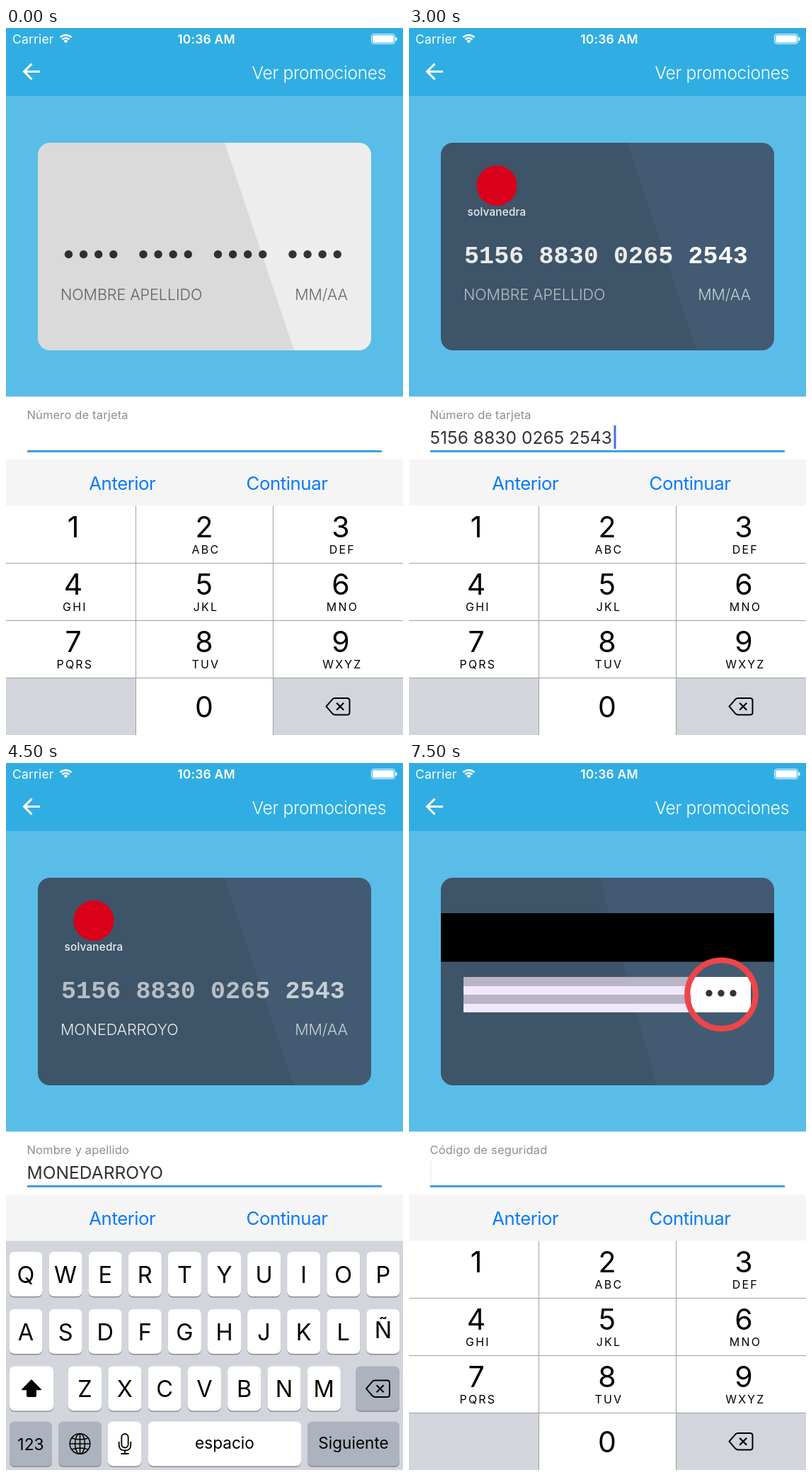
These frames come from a looping animation (561x998 px, 8 s). An HTML page with a canvas:

```html
<!DOCTYPE html>
<html lang="es">
<head>
<meta charset="utf-8">
<title>Formulario de tarjeta</title>
<style>
  html, body { margin: 0; width: 100%; height: 100%; overflow: hidden; background: #fff; }
  canvas { display: block; width: 561px; height: 998px; }
</style>
</head>
<body>
<canvas id="stage" width="561" height="998"></canvas>
<script>
const ctx = document.getElementById('stage').getContext('2d');
const SANS = 'Inter, Roboto, sans-serif';
const MONO = '"Liberation Mono", monospace';
const LOOP = 8000, STEP = 1500;
const CARD = { x: 45, y: 162, w: 471, h: 293, r: 17 };
const HOLDER = 'MONEDARROYO', NUMBER = '5156 8830 0265 2543';

const steps = [
  { label: 'Número de tarjeta', value: '', digits: '', focus: 'number', plain: true },
  { label: 'Número de tarjeta', value: '5156 88', digits: '5156 88', focus: 'number' },
  { label: 'Número de tarjeta', value: NUMBER, digits: NUMBER, focus: 'number', caret: 291 },
  { label: 'Nombre y apellido', value: HOLDER, digits: NUMBER, name: HOLDER, focus: 'name', letters: true },
  { label: 'Fecha de expiración', value: '12/31', digits: NUMBER, name: HOLDER, date: '12/31', focus: 'date', caret: 90.7 },
  { label: 'Código de seguridad', value: '', back: true, caret: 31, caretAlpha: 0.06 }
];

function text(str, x, y, size, color, { align = 'left', weight = 400, gap = 0, font = SANS } = {}) {
  ctx.font = `${weight} ${size}px ${font}`;
  ctx.letterSpacing = gap + 'px';
  ctx.textAlign = align;
  ctx.fillStyle = color;
  ctx.fillText(str, x, y);
}

function rect(x, y, w, h, color) {
  ctx.fillStyle = color;
  ctx.fillRect(x, y, w, h);
}

function round(x, y, w, h, r, color) {
  ctx.beginPath();
  ctx.roundRect(x, y, w, h, r);
  ctx.fillStyle = color;
  ctx.fill();
}

function dot(x, y, r, color) {
  ctx.beginPath();
  ctx.arc(x, y, r, 0, Math.PI * 2);
  ctx.fillStyle = color;
  ctx.fill();
}

function stroke(d, color, width, x = 0, y = 0) {
  ctx.save();
  ctx.translate(x, y);
  ctx.strokeStyle = color;
  ctx.lineWidth = width;
  ctx.stroke(new Path2D(d));
  ctx.restore();
}

function fill(d, color, x = 0, y = 0) {
  ctx.save();
  ctx.translate(x, y);
  ctx.fillStyle = color;
  ctx.fill(new Path2D(d));
  ctx.restore();
}

function drawHeader() {
  rect(0, 0, 561, 96, '#30aee3');
  text('Carrier', 9, 22, 17.5, '#fff', { gap: 0.2 });
  text('10:36 AM', 283, 21.5, 17.5, '#fff', { align: 'center', weight: 600, gap: 0.2 });

  const up = -Math.PI / 2, spread = 0.76;
  ctx.strokeStyle = '#fff';
  ctx.lineWidth = 2.5;
  for (const r of [11.6, 7.3]) {
    ctx.beginPath();
    ctx.arc(84.5, 21.5, r, up - spread, up + spread);
    ctx.stroke();
  }
  ctx.beginPath();
  ctx.moveTo(84.5, 21.5);
  ctx.arc(84.5, 21.5, 4.4, up - spread, up + spread);
  ctx.fillStyle = '#fff';
  ctx.fill();

  ctx.beginPath();
  ctx.roundRect(516.5, 8.7, 33, 13.6, 3);
  ctx.lineWidth = 1;
  ctx.stroke();
  round(518, 10.2, 30, 10.6, 1.8, '#fff');
  round(550.5, 13, 2, 5, 1, '#fff');

  stroke('M36.5 50.5L25.6 61.5L36.5 72.5M26 61.5H48', '#fff', 3);
  text('Ver promociones', 537, 72, 24.6, '#fff', { align: 'right', weight: 300, gap: -0.35 });
}

// Darkens the part of the card left of a slanted edge.
function shade(top, bottom) {
  const { x, y, h } = CARD;
  ctx.beginPath();
  ctx.moveTo(x, y);
  ctx.lineTo(top, y);
  ctx.lineTo(bottom, y + h);
  ctx.lineTo(x, y + h);
  ctx.fillStyle = 'rgba(0,0,0,0.08)';
  ctx.fill();
}

function drawFront(s) {
  const ink = s.plain ? '51,51,51' : '255,255,255';
  const tone = part => `rgba(${ink},${s.focus === part ? 1 : 0.7})`;

  if (!s.plain) {
    dot(124, 222.5, 28.5, '#eb001b');
    text('solvanedra', 124, 265, 15.3, '#fff', { align: 'center', weight: 500, gap: 0.2 });
  }
  for (let i = 0; i < NUMBER.length; i++) {
    if (NUMBER[i] === ' ') continue;
    const x = 88.5 + 21.1 * i;
    if (i < s.digits.length)
      text(s.digits[i], x, 331.5, 35, tone('number'), { align: 'center', weight: 700, font: MONO });
    else dot(x, 319.5, 5.7, tone('number'));
  }
  const style = { weight: 300, gap: -0.1 };
  text(s.name || 'NOMBRE APELLIDO', 77, 383.5, 21.6, tone('name'), style);
  text(s.date || 'MM/AA', 483, 383.5, 21.6, tone('date'), { ...style, align: 'right' });
  shade(309, 407);
}

function drawBack() {
  shade(269, 350);
  rect(45, 212, 471, 68.5, '#000');
  for (let i = 0; i < 4; i++)
    rect(77, 302 + i * 12.5, 322, 12.5, i % 2 ? '#f0e8fe' : '#bab4c4');
  rect(399, 302, 84, 50, '#fff');
  for (let i = 0; i < 3; i++) dot(424 + i * 17, 325, 4.7, '#333');
  ctx.beginPath();
  ctx.arc(441.5, 326.7, 48.3, 0, Math.PI * 2);
  ctx.strokeStyle = '#ef4549';
  ctx.lineWidth = 8;
  ctx.stroke();
}

function drawCard(s) {
  rect(0, 96, 561, 424.5, '#5abde7');
  ctx.save();
  ctx.beginPath();
  ctx.roundRect(CARD.x, CARD.y, CARD.w, CARD.h, CARD.r);
  ctx.clip();
  rect(CARD.x, CARD.y, CARD.w, CARD.h, s.plain ? '#ededed' : '#425b72');
  s.back ? drawBack() : drawFront(s);
  ctx.restore();
}

function drawField(s) {
  rect(0, 520.5, 561, 88.5, '#fff');
  text(s.label, 29.5, 552, 16.5, '#8e8e8e', { gap: 0.15 });
  text(s.value, 29.5, 586.5, 24.6, '#333');
  if (s.caret) {
    ctx.globalAlpha = s.caretAlpha || 1;
    rect(s.caret - 1.5, 561, 3, 33, '#4a6be0');
    ctx.globalAlpha = 1;
  }
  rect(30, 596, 501, 3, '#419fdb');
  rect(0, 609, 561, 65.5, '#f5f5f5');
  const style = { align: 'center', gap: -0.45 };
  text('Anterior', 164.3, 651.5, 25.8, '#087bfb', style);
  text('Continuar', 397, 651.5, 25.8, '#087bfb', style);
}

function eraseIcon(x, y) {
  ctx.lineJoin = 'round';
  stroke('M-16.5 0L-7.5-10.4Q-6-11.8-4-11.8H13Q16.5-11.8 16.5-8.3V8.3Q16.5 11.8 13 11.8H-4Q-6 11.8-7.5 10.4Z', '#000', 2, x, y);
  stroke('M-1.8-5L8.2 5M8.2-5L-1.8 5', '#000', 2.2, x, y);
  ctx.lineJoin = 'miter';
}

function drawKeypad() {
  const centers = [95, 280, 473];
  const hints = ['', 'ABC', 'DEF', 'GHI', 'JKL', 'MNO', 'PQRS', 'TUV', 'WXYZ'];
  rect(0, 674.5, 561, 323.5, '#fff');
  rect(0, 917.5, 183.5, 81, '#d2d5dc');
  rect(377.5, 917.5, 183.5, 81, '#d2d5dc');
  hints.forEach((hint, i) => {
    const x = centers[i % 3], y = 719 + 81 * Math.floor(i / 3);
    text(i + 1, x, y, 41, '#000', { align: 'center' });
    text(hint, x + 2.4, y + 23, 16, '#000', { align: 'center', gap: 2.2 });
  });
  text('0', 280, 973, 41, '#000', { align: 'center' });
  for (const x of [183, 377]) rect(x, 674.5, 1, 323.5, '#a0a1a5');
  for (const y of [755, 836, 917]) rect(0, y, 561, 1, '#a0a1a5');
  eraseIcon(469, 957.7);
}

function key(x, y, w, label = '', size = 32.5, dark = false, drop = 43.5) {
  round(x, y + 1.5, w, 63, 7, '#888b90');
  round(x, y, w, 63, 7, dark ? '#adb3be' : '#fff');
  text(label, x + w / 2, y + drop, size, '#000', { align: 'center' });
}

function drawLetters() {
  rect(0, 674.5, 561, 323.5, '#d2d5dc');
  ['QWERTYUIOP', 'ASDFGHJKLÑ'].forEach((row, r) =>
    [...row].forEach((c, i) => key(4.5 + 56.1 * i, 690 + 81 * r, 47, c, 32.5, false, c === 'Ñ' ? 40.5 : 43.5)));
  [...'ZXCVBNM'].forEach((c, i) => key(88 + 56.3 * i, 851.5, 47, c));

  key(5, 851.5, 62);
  fill('M0-13.5L14 .7Q14.3 1.8 13 1.8H7V9.5Q7 11.5 5 11.5H-5Q-7 11.5-7 9.5V1.8H-13Q-14.3 1.8-14 .7Z', '#000', 36, 883.5);
  key(494, 851.5, 62, '', 0, true);
  eraseIcon(525.5, 883.2);

  const y = 929.5;
  key(5, y, 60, '123', 22.8, true, 40);
  key(74, y, 61, '', 0, true);
  key(144, y, 47);
  key(201, y, 216, 'espacio', 22.6, false, 38.5);
  key(426, y, 130, 'Siguiente', 22.6, true, 38.5);

  // Globe
  ctx.strokeStyle = '#000';
  ctx.lineWidth = 1.5;
  for (const rx of [14.3, 7]) {
    ctx.beginPath();
    ctx.ellipse(104.5, 961, rx, 14.3, 0, 0, Math.PI * 2);
    ctx.stroke();
  }
  stroke('M-14.3 0H14.3M0-14.3V14.3M-11.5-8Q0-3.8 11.5-8M-11.5 8Q0 3.8 11.5 8', '#000', 1.5, 104.5, 961);

  // Microphone
  ctx.beginPath();
  ctx.roundRect(163.3, 947, 9.4, 19.5, 4.7);
  ctx.lineWidth = 1.8;
  ctx.stroke();
  stroke('M-8.3-3V1.5Q-8.3 9.5 0 9.5Q8.3 9.5 8.3 1.5V-3M0 9.5V14M-5.5 14H5.5', '#000', 1.8, 168, 961);
}

function draw(now) {
  const s = steps[Math.floor((now % LOOP) / STEP)];
  drawHeader();
  drawCard(s);
  drawField(s);
  s.letters ? drawLetters() : drawKeypad();
}

let start;
function tick(now) {
  start ??= now;
  draw(Math.max(0, now - start));
  requestAnimationFrame(tick);
}
draw(0);
requestAnimationFrame(tick);
</script>
</body>
</html>
```
